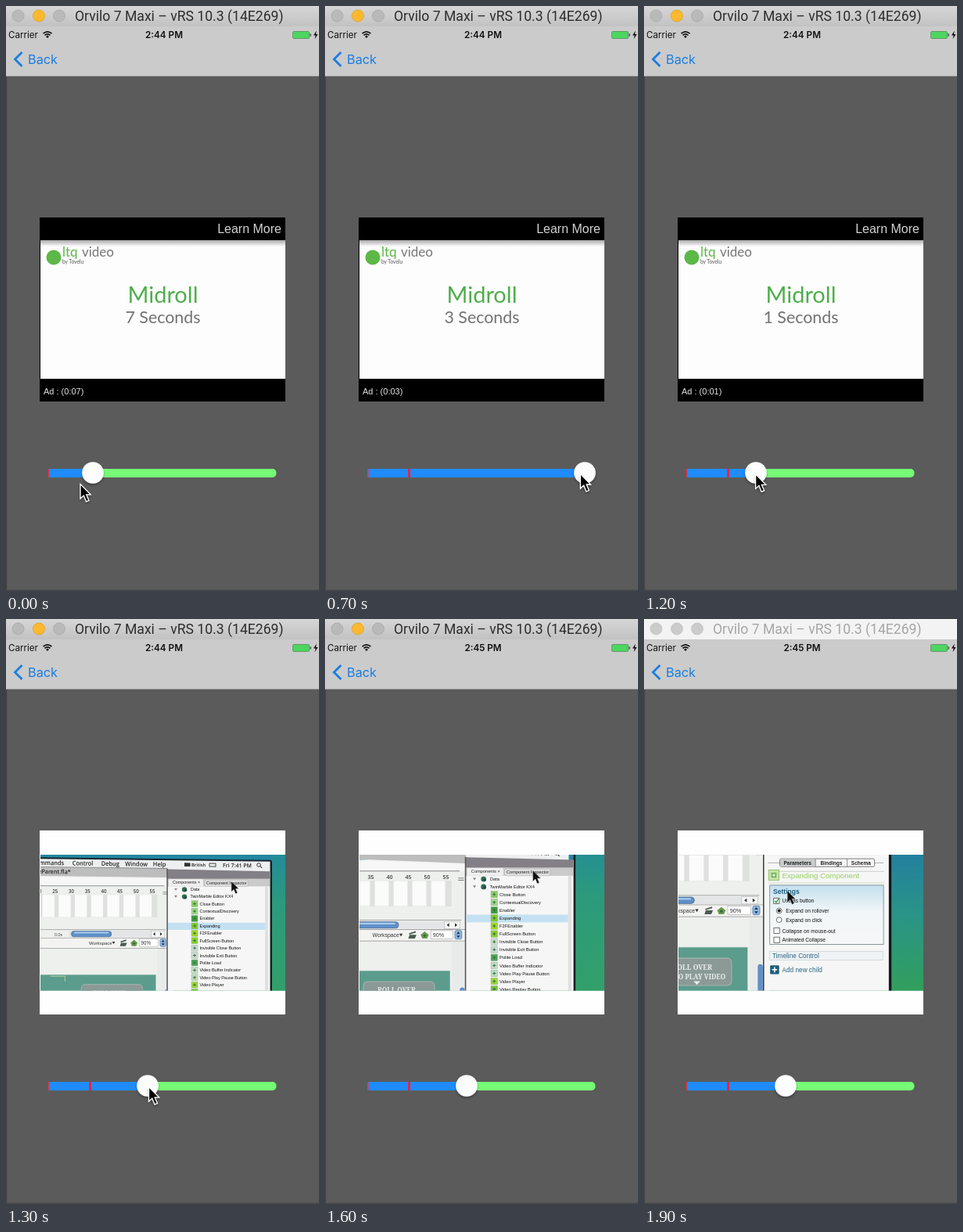
An HTML page that plays this animation: 400x747 px, repeating every 2000 ms.

```html
<!DOCTYPE html>
<html lang="en">
<head>
<meta charset="utf-8">
<title>Midroll slider</title>
<style>
html, body { margin: 0; width: 100%; height: 100%; overflow: hidden; background: #5b5b5b; }
svg { display: block; width: 100%; height: 100%; }
text { white-space: pre; }
.ui { font-family: Inter, sans-serif; }
.sans { font-family: "Liberation Sans", Arial, sans-serif; }
.lato { font-family: Lato, sans-serif; }
.menu { font-family: "Open Sans", sans-serif; font-weight: 600; }
</style>
</head>
<body>
<svg id="stage" viewBox="0 0 400 747" preserveAspectRatio="none"></svg>
<script>
const stage = document.getElementById('stage');

// Markup helpers
const rect = (x, y, w, h, fill, more = '') =>
  `<rect x="${x}" y="${y}" width="${w}" height="${h}" fill="${fill}" ${more}/>`;
const text = (x, y, size, fill, str, more = '') =>
  `<text x="${x}" y="${y}" font-size="${size}" fill="${fill}" ${more}>${str}</text>`;
const path = (d, fill, more = '') => `<path d="${d}" fill="${fill}" ${more}/>`;
const circle = (x, y, r, fill, more = '') => `<circle cx="${x}" cy="${y}" r="${r}" fill="${fill}" ${more}/>`;
const group = (id, body) => `<g id="${id}">${body}</g>`;
const gradient = (id, ...stops) => `<linearGradient id="${id}" x1="0" y1="0" x2="0" y2="1">` +
  stops.map(([at, color]) => `<stop offset="${at}" stop-color="${color}"/>`).join('') + '</linearGradient>';
const range = n => Array.from({ length: n }, (_, i) => i);
const end = 'text-anchor="end"', mid = 'text-anchor="middle"', bold = 'font-weight="700"';
const arrow = 'M0 0V18.5L4.3 14.6L7.5 22.3L10.9 20.9L7.7 13.4H13.2Z';

const defs = `<defs>
  ${gradient('bar', [0, '#d6d6d6'], [1, '#c2c2c2'])}
  ${gradient('fade', [0, '#a9a9a9'], [1, '#fdfdfd'])}
  ${gradient('wall', [0, '#23809f'], [.45, '#2a9486'], [1, '#319f5d'])}
  ${gradient('greenWall', [0, '#2287a2'], [.35, '#2c9a7c'], [1, '#35a264'])}
  ${gradient('blueFade', [0, '#c4e0ef'], [.45, '#f1f6f8'], [1, '#f6f7f7'])}
  <clipPath id="clip">${rect(44, 301, 313, 173.5, '#fff')}</clipPath>
  <filter id="shadow" x="-50%" y="-50%" width="200%" height="200%">
    <feDropShadow dx="0" dy="2" stdDeviation="1.8" flood-opacity=".35"/></filter>
</defs>`;

const phone = rect(0, 0, 400, 747, '#5b5b5b') +
  rect(0, 26, 400, 63, '#cbcbcb') + rect(0, 89, 400, 1, '#a0a0a0') +
  rect(0, 0, 400, 26, 'url(#bar)', 'id="bar-bg"') +
  [15.5, 42, 68].map((x, i) => circle(x, 12.5, 7.5, '#b9b9b9', `id="light${i}" stroke-width=".8"`)).join('') +
  text(88, 19, 17.6, '#2d2d2d', 'Orvilo 7 Maxi – vRS 10.3 (14E269)', 'id="title" font-family="Roboto, sans-serif"') +
  `<g class="ui">${text(3, 41, 11.6, '#111', 'Carrier')}
  ${text(202, 41, 11.7, '#111', '2:44 PM', `id="clock" font-weight="600" ${mid}`)}
  ${text(28, 74, 16.3, '#1a7de2', 'Back')}</g>` +
  path('M47.5 35.2Q53 30.4 58.5 35.2M49.5 37.4Q53 34.4 56.5 37.4', 'none', 'stroke="#111" stroke-width="1.6"') +
  path('M51 39L53 37.6L55 39L53 41Z', '#111') +
  rect(366.5, 32.5, 21, 9, '#4cd660', 'rx="1.5" stroke="#5c8a62" stroke-width=".8"') +
  rect(388.4, 35, 1.5, 4, '#555', 'rx=".7"') +
  path('M396.8 31.5L393 37.6H395.6L394.6 42.3L398.6 36H396Z', '#111') +
  path('M20.5 59L11.5 68L20.5 77', 'none', 'stroke="#1a7de2" stroke-width="2.8"') +
  rect(0, 90, 1.2, 657, '#444') + rect(0, 745.5, 400, 1.5, '#474747');

const ad = rect(43, 270, 314, 235, '#000') + rect(44, 299, 313, 177, '#fdfdfd') +
  rect(44, 299, 313, 8, 'url(#fade)') +
  `<g class="sans">${text(352, 290, 16, '#d2d2d2', 'Learn More', end)}
  ${text(48, 496, 11, '#e2e2e2', '', 'id="left"')}</g>` +
  circle(61, 321, 9.5, '#5cb847') +
  `<g class="lato">${text(72, 320, 17, '#5cb847', 'ltq')}${text(97, 320, 17, '#777', 'video')}
  ${text(72, 329, 6.6, '#555', 'by Tovelu')}
  ${text(200.5, 379, 29, '#4fae4b', 'Midroll', mid)}
  ${text(200.5, 404.5, 21.4, '#727272', '', `id="seconds" ${mid}`)}</g>`;

// Pieces of the filmed editor; the menu rows are level here and tilted by their transforms
const tray = rect(-60, 303, 399, 24, '#eeeff0') + rect(-60, 302, 400, 2, '#17272c') +
  rect(228, 307, 7.5, 4.6, '#333') + rect(260, 307.3, 8, 4, 'none', 'stroke="#333" stroke-width=".9"') +
  `<g class="menu">${text(237, 311.5, 5.8, '#222', 'British')}${text(277, 312, 7, '#222', 'Fri 7:41 PM')}</g>` +
  circle(323, 308.5, 2.3, 'none', 'stroke="#222" stroke-width=".9"') + path('M325 310L327 312.5', 'none', 'stroke="#222"');

const menuBar = rect(-60, 314.5, 267, 11.5, '#bdbdbd') + rect(-60, 314, 267, .8, '#888') +
  '<g class="menu">' + [[65, 'Commands'], [105, 'Control'], [141, 'Debug'], [180, 'Window'], [205, 'Help']]
    .map(([x, s]) => text(x, 312, 8, '#222', s, end)).join('') +
  text(74, 323, 7.6, '#222', 'veParent.fla*', end) + '</g>';

const editor = rect(-60, 315, 275, 207, '#eef0ee') + rect(-60, 315, 275, 22, '#f6f7f6') +
  rect(-60, 337, 262, 1, '#8b8f8d') + rect(-60, 349, 252, 31, '#dfe1df') +
  range(13).map(i => {
    const x = 185 - 23 * i;
    return text(x, 347.5, 6.8, '#3c3c3c', 55 - 5 * i, `${mid} class="menu"`) +
      rect(x - 18, 349.5, 17, 30, '#fafbfa');
  }).join('') +
  path('M200 346H207M200 348.5H207', 'none', 'stroke="#555" stroke-width=".7"') +
  rect(-60, 396, 264, .8, '#999') + rect(66, 398, 118, 8.5, '#e3e5e6') +
  rect(70, 398.4, 57, 7.6, '#5f90c9', 'rx="3.8" stroke="#33557f" stroke-width=".6"') +
  rect(74, 399.4, 49, 2.2, '#a9cbec', 'rx="1"') +
  text(46, 405, 6, '#444', '0.0s', 'class="sans"') +
  rect(183, 398, 19, 8.5, '#f5f5f5', 'stroke="#aaa" stroke-width=".5"') +
  path('M189 400V404.5L186 402.2ZM196 400V404.5L199 402.2Z', '#333') +
  rect(-60, 407.2, 275, .8, '#888') + rect(-60, 408, 275, 13, '#f3f4f2') +
  text(95, 417, 6.6, '#333', 'Workspace', 'class="sans"') + path('M128 412.6H132L130 416Z', '#333') +
  path('M140 412L148 409.5V411.5L140 413.8ZM140.5 414H149L147 418.5H139Z', '#4d5a50') +
  path('M154 414L159 410L164 414L162 418.5H156Z', '#6a9b52') + circle(159, 415, 1.8, '#3d6c39') +
  rect(166.5, 409, 27, 10, '#fff', 'stroke="#999" stroke-width=".5"') +
  text(169, 416.7, 6.8, '#333', '90%', 'class="sans"') +
  rect(196, 408.8, 8.5, 10.4, '#8fb9e4', 'rx="2" stroke="#3a679c" stroke-width=".6"') +
  path('M198 413L200.2 410.2L202.4 413ZM198 415L200.2 417.8L202.4 415Z', '#234') +
  rect(-60, 421, 275, .8, '#999') +
  rect(-60, 457, 250, 80, '#5b9c8c') + rect(-60, 457, 250, 1, '#7fb5a5') +
  path('M40 459H61V466', 'none', 'stroke="#b6d6a0" stroke-width="1"') +
  rect(84, 470, 87, 32, '#8b9a96', 'rx="5" stroke="#a9b5b1" stroke-width="1"') +
  `<g font-family="Noto Serif, serif" ${bold}>${text(148, 483.5, 8, '#e9efec', 'ROLL OVER', end)}
  ${text(164, 494.5, 7.7, '#e9efec', 'TO PLAY VIDEO', end)}</g>` + path('M126 497H134L130 501Z', '#e9efec') +
  rect(192, 422, 23, 100, '#e9eaea') + rect(202, 477, 6, 40, '#5f90c9', 'rx="3"');

const parts = ['Close Button', 'ContextualDiscovery', 'Enabler', 'Expanding', 'F2FEnabler', 'FullScreen Button',
  'Invisible Close Button', 'Invisible Exit Button', 'Polite Load', 'Video Buffer Indicator',
  'Video Play Pause Button', 'Video Player', 'Video Replay Button'];
const partColors = ['#8fce6a', '#a3d690', '#3f9b45', '#85c92d', '#a3d72c', '#8bcf33',
  '#cfdcd8', '#cfdcd8', '#4da659', '#c8dccb', '#c3dcc4', '#9cd83c', '#7bc142'];

const listPanel = rect(207, 322, 132, 180, '#f5f6f5') +
  path('M207 318.5L338 321.5V331.5H207Z', '#827f86') + rect(207, 331, 131, 10, '#c9cac9') +
  rect(209, 331.5, 44, 9.5, '#efefef', 'rx="1"') + rect(255, 332.5, 55, 8.5, '#dcdddc', 'rx="1" stroke="#aaa" stroke-width=".4"') +
  rect(206.3, 318, 1.5, 180, '#555') + rect(208, 388.3, 124, 9.4, '#c4e1f3') + rect(332, 341, 4, 150, '#dfe0df') +
  `<g class="sans">${text(214, 337.5, 5.4, '#222', 'Components ×')}
  ${text(257, 338.5, 5.4, '#222', 'Component Inspector')}
  ${text(237, 346.8, 5.4, '#111', 'Data')}${text(236.5, 356.2, 5.4, '#111', 'TwinMarble Editor KX4')}` +
  [345, 354.4].map(y => path(`M216 ${y - 1.5}H220L218 ${y + 1.5}Z`, '#888') +
    circle(229, y, 3.2, '#2f6d4b') + circle(230.5, y + 1, 1.6, '#263c58')).join('') +
  parts.map((s, i) => {
    const y = 363.7 + 9.6 * i;
    return rect(238, y - 4, 8, 8, partColors[i], 'stroke="#7ea877" stroke-width=".4"') +
      path(`M240 ${y}H244M242 ${y - 2}V${y + 2}`, 'none', 'stroke="#37733c" stroke-width="1"') +
      text(248.5, y + 2, 5.5, '#111', s);
  }).join('') + '</g>' +
  rect(340, 280, 120, 240, 'url(#greenWall)') + rect(338.5, 308, 2.5, 200, '#182022') +
  path(arrow, '#111', 'transform="translate(289 334.5) scale(.72)" stroke="#ddd" stroke-width=".6"');

const check = (x, y, on) => rect(x - 3.8, y - 3.8, 7.6, 7.6, '#fff', 'stroke="#444" stroke-width=".8"') +
  (on ? path(`M${x - 2.5} ${y}L${x - .5} ${y + 2.2}L${x + 3} ${y - 3}`, 'none', 'stroke="#2f9a3c" stroke-width="1.4"') : '');
const radio = (y, on) => circle(172, y, 3.6, '#fff', 'stroke="#444" stroke-width=".8"') + (on ? circle(172, y, 2.1, '#111') : '');

const settings = rect(159, 304.5, 10, 10, '#62c22e') +
  path('M161 306.5L167 312.5M167 306.5L161 312.5', 'none', 'stroke="#d8f3b8" stroke-width="1.2"') +
  path('M299 315L301.5 310.5L298.5 308H302.5L304 305L305.5 308H309.5L306.5 310.5L309 315L304 312.5Z', '#4c7a2d') +
  rect(157, 328, 154, .8, '#999') +
  rect(173, 323, 126, 10.6, '#f7f7f7', 'rx="2" stroke="#555" stroke-width=".8"') +
  rect(173.4, 323.4, 47, 9.8, '#c9cccc', 'rx="2"') + path('M220.5 323V333.6M262.5 323V333.6', 'none', 'stroke="#666" stroke-width=".7"') +
  rect(158, 339.5, 154, .8, '#bcc6bc') + rect(158, 355, 154, .8, '#c3d9b4') +
  rect(158, 338, 14, 14, '#c7e5a9', 'stroke="#80b65a" stroke-width=".8"') + rect(161.5, 341.5, 7, 7, '#79b65d') + circle(165, 345, 1.6, '#eef7e6') +
  rect(159.5, 358.5, 151.5, 79.5, 'url(#blueFade)', 'stroke="#7b898f" stroke-width=".9"') +
  rect(159.5, 447.5, 150.5, 11.5, '#eff3f5', 'stroke="#c4cdd2" stroke-width=".7"') +
  check(168.5, 379.5, true) + radio(392.8, true) + radio(405, false) + check(168.8, 419.5) + check(168.8, 432) +
  rect(160, 466, 12, 12, '#1d5d79', 'rx="1.5"') + path('M162.5 472H169.5M166 468.5V475.5', 'none', 'stroke="#fff" stroke-width="1.6"') +
  '<g class="sans">' +
  text(176, 312.5, 7, '#111', 'Expanding') +
  [[196.5, 'Parameters'], [241.5, 'Bindings'], [281, 'Schema']].map(([x, s]) => text(x, 331, 6.8, '#222', s, `${mid} ${bold}`)).join('') +
  text(176, 349.5, 10.1, '#97cf62', 'Expanding Component') + text(164, 370, 8.9, '#1f5f83', 'Settings', bold) +
  [[176, 382, 'Use as button'], [181, 395.3, 'Expand on rollover'], [181, 407.5, 'Expand on click'],
    [176, 422.5, 'Collapse on mouse-out'], [176, 434.6, 'Animated Collapse']].map(([x, y, s]) => text(x, y, 6.9, '#111', s)).join('') +
  text(163, 456.3, 8.6, '#2a6583', 'Timeline Control') + text(176, 475, 8.6, '#2a6583', 'Add new child') + '</g>' +
  path(arrow, '#111', 'transform="translate(183 366) scale(.82)" stroke="#ddd" stroke-width=".5"');

const film = rect(43, 270, 314, 235, '#fefefe') + '<g clip-path="url(#clip)">' +
  rect(44, 300, 313, 175, 'url(#wall)') +
  group('editor', editor) +
  group('wide', rect(44, 290, 313, 18, '#2287a2') + group('tray', tray) + group('menu', menuBar) + group('list', listPanel)) +
  group('close', rect(153, 300, 160, 175, '#f5f6f5') + rect(152, 300, 1.6, 175, '#444') +
    rect(312, 300, 46, 175, 'url(#wall)') + rect(312, 300, 10, 175, '#cfd3d3', 'id="bezel"') +
    rect(320, 300, 3.5, 175, '#141a1b', 'id="edge"') + group('settings', settings)) + '</g>';

const slider = rect(54, 591, 291.5, 11, '#76fb76', 'rx="5"') + rect(54, 591, 60, 11, '#1f8bfc', 'id="fill"') +
  rect(54, 591, 1.6, 11, '#e8324e') + rect(106, 591, 3, 11, '#e82440') +
  circle(111, 596, 13.8, '#fdfdfd', 'id="thumb" filter="url(#shadow)"') +
  path(arrow, '#000', 'id="cursor" stroke="#fff" stroke-width="1.3" filter="url(#shadow)"');

stage.innerHTML = defs + phone + group('ad', ad) + group('film', film) + slider;

const el = id => document.getElementById(id);
const set = (id, attrs) => { for (const k in attrs) el(id).setAttribute(k, attrs[k]); };
const show = (id, on) => set(id, { display: on ? 'inline' : 'none' });

// Linear interpolation over [step, ...values] rows
function at(n, keys) {
  let i = 0;
  while (i < keys.length - 2 && n >= keys[i + 1][0]) i++;
  const [a, b] = [keys[i], keys[i + 1]];
  const k = Math.max(0, Math.min(1, (n - a[0]) / (b[0] - a[0])));
  return a.slice(1).map((v, j) => v + (b[j + 1] - v) * k);
}

// Scale by sx, sy so that point (x, y) lands on (px, py)
const place = (x, y, px, py, sx, sy, skew = 0) =>
  `translate(${px} ${py}) matrix(${sx} ${skew} 0 ${sy} 0 0) translate(${-x} ${-y})`;

const thumbX = [[0, 111], [1, 111], [3, 114], [4, 120], [6, 322], [7, 332], [9, 113], [10, 67], [13, 181]];
const cursorAt = [[0, -16, 610.5], [1, -8, 601], [4, -5, 595.5], [9, -6, 599], [13, 1.5, 597.5]];
const editorAt = [[13, 187, 402, .9, .95], [15, 185, 402, 1, 1], [17, 124, 379, 1.087, 1.13], [19, 127, 359, 1.08, 1.09]];
const menuAt = [[13, 197, 313, .93, .012], [15, 197, 309, 1, .048], [17, 142, 280, 1.08, .03]];
const listAt = [[13, 206, 364, .98], [15, 207, 364, 1], [17, 152, 340, 1.1]];
const settingsAt = [[17, 164, 367, 1, 1], [19, 165, 348, .96, .951]];
const bezelAt = [[17, 11], [19, 4.5]];

function draw(ms) {
  const n = Math.floor(ms / 100) % 20;
  const playing = n >= 13, active = n < 18;

  set('bar-bg', { fill: active ? 'url(#bar)' : '#f3f3f3' });
  set('title', { fill: active ? '#2d2d2d' : '#a6a6a6' });
  for (const i of range(3)) {
    const [fill, stroke] = !active ? ['#cbcbcb', '#c0c0c0'] : i === 1 ? ['#fdb92e', '#dfa023'] : ['#b9b9b9', '#a8a8a8'];
    set('light' + i, { fill, stroke });
  }
  el('clock').textContent = n < 14 ? '2:44 PM' : '2:45 PM';

  const left = Math.max(0, Math.floor(7.4 - .53 * n));
  el('left').textContent = `Ad : (0:0${left})`;
  el('seconds').textContent = `${left} Seconds`;
  show('ad', !playing);
  show('film', playing);

  const [x] = at(n, thumbX), [dx, cy] = at(n, cursorAt);
  set('thumb', { cx: x });
  set('fill', { width: x - 54 });
  set('cursor', { transform: `translate(${x + dx} ${cy})` });
  show('cursor', n < 14);

  if (!playing) return;
  const close = n >= 17;
  show('wide', !close);
  show('close', close);
  const [ex, ey, esx, esy] = at(n, editorAt);
  set('editor', { transform: place(185, 402, ex, ey, esx, esy) });
  const [mx, my, zoom, skew] = at(n, menuAt);
  set('menu', { transform: place(197, 309, mx, my, zoom, 1, skew) });
  set('tray', { transform: place(197, 309, mx, my, 1, 1, skew) });
  const [lx, ly, ls] = at(n, listAt);
  set('list', { transform: place(207, 364, lx, ly, Math.max(1, ls), ls) });
  const [sx, sy, kx, ky] = at(n, settingsAt);
  set('settings', { transform: place(164, 367, sx, sy, kx, ky) });
  const [w] = at(n, bezelAt);
  set('bezel', { width: w });
  set('edge', { x: 312 + w - 3.5 });
}

const start = performance.now();
function tick() {
  draw((performance.now() - start) % 2000);
  requestAnimationFrame(tick);
}
tick();
</script>
</body>
</html>
```
